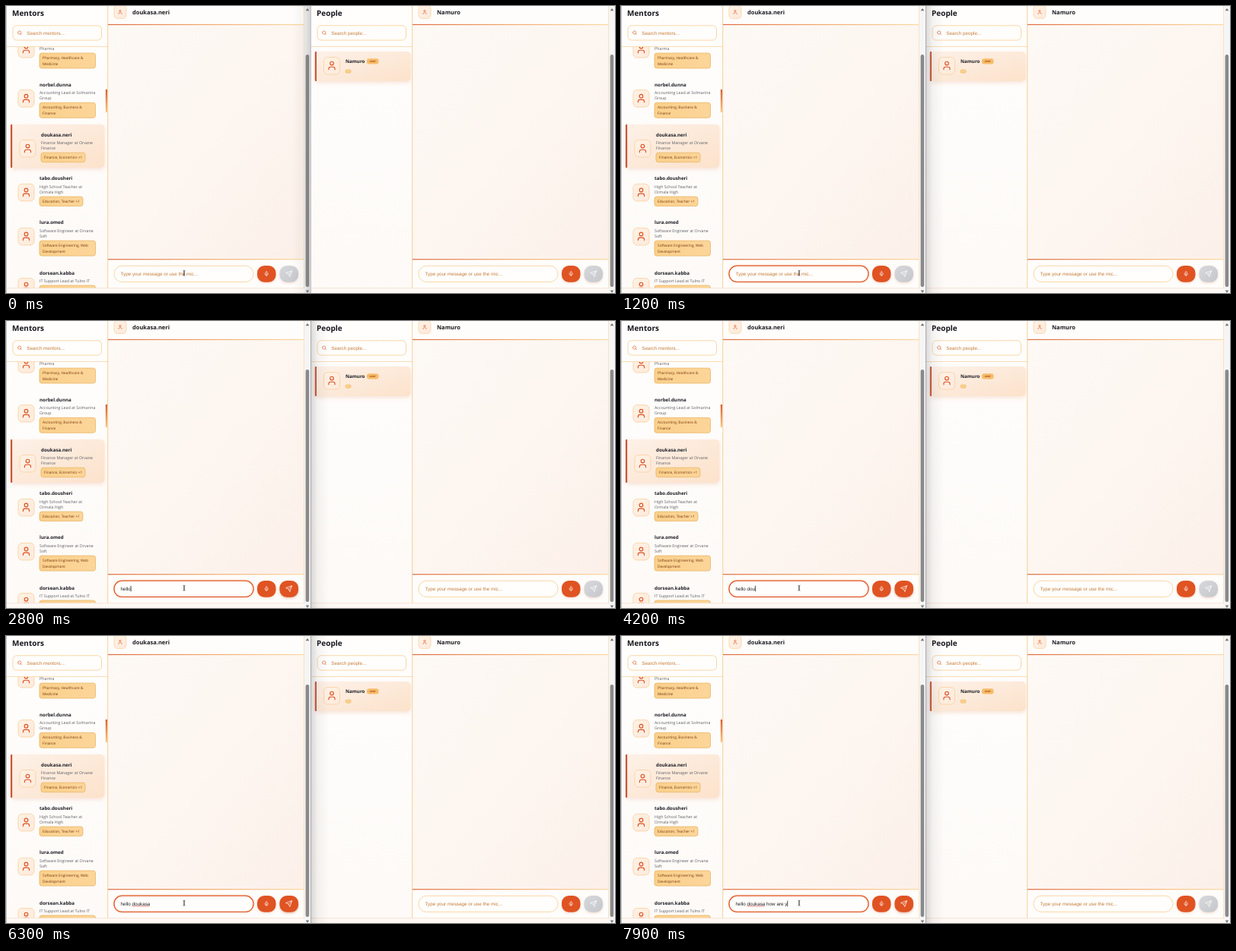
Animation, 800 px wide and 378 px high, one loop 8000 ms. Source, as an HTML page:

```html
<!DOCTYPE html>
<html lang="en">
<head>
<meta charset="utf-8">
<title>Mentor chat</title>
<style>
  html, body { margin: 0; width: 100%; height: 100%; overflow: hidden; background: #fff; }
  svg { display: block; width: 800px; height: 378px; }
  text { font-family: "Open Sans", "Noto Sans", sans-serif; text-rendering: geometricPrecision; white-space: pre; }
  .title { font-size: 10px; font-weight: 700; fill: #15151c; }
  .head { font-size: 7.5px; font-weight: 700; fill: #1c1c22; }
  .name { font-size: 6.2px; font-weight: 700; fill: #1f1f26; }
  .role { font-size: 5.3px; fill: #5d5f66; }
  .tag { font-size: 4.8px; font-weight: 500; fill: #7a3a12; }
  .field { font: 6.3px "Liberation Sans", Arial, sans-serif; fill: #c57a35; }
  .typed { fill: #222; }
  .icon { fill: none; stroke-linecap: round; stroke-linejoin: round; }
  .fade { opacity: 0; animation: 8s linear infinite both; }
  .focus { animation-name: focus; }
  .ready { animation-name: ready; }
  .idle { animation-name: idle; }
  @keyframes focus { 0%, 5% { opacity: 0 } 8%, 100% { opacity: 1 } }
  @keyframes ready { 0%, 25.6% { opacity: 0 } 29%, 100% { opacity: 1 } }
  @keyframes idle { 0%, 5% { opacity: 1 } 7%, 100% { opacity: 0 } }
</style>
</head>
<body>
<svg id="stage" viewBox="0 0 800 378" xmlns="http://www.w3.org/2000/svg"></svg>
<script>
const stage = document.getElementById('stage');

const text = (cls, x, y, s) => `<text class="${cls}" x="${x}" y="${y}">${s.replace('&', '&amp;')}</text>`;
const box = (x, y, w, h, r, fill, stroke = 'none', more = '') =>
  `<rect x="${x}" y="${y}" width="${w}" height="${h}" rx="${r}" fill="${fill}" stroke="${stroke}" ${more}/>`;
const icon = (d, x, y, scale, color, width = 2) =>
  `<path class="icon" d="${d}" stroke="${color}" stroke-width="${width}" transform="translate(${x} ${y}) scale(${scale}) translate(-12 -12)"/>`;
const gradient = (id, dir, ...stops) =>
  `<linearGradient id="${id}" ${dir}>` + stops.map(([o, c, a = 1]) =>
    `<stop offset="${o}" stop-color="${c}" stop-opacity="${a}"/>`).join('') + '</linearGradient>';

const USER = 'M19 21v-2a4 4 0 0 0-4-4H9a4 4 0 0 0-4 4v2M8 7a4 4 0 1 0 8 0a4 4 0 1 0-8 0';
const LENS = 'M3 11a8 8 0 1 0 16 0a8 8 0 1 0-16 0M21 21l-4.3-4.3';
const MIC = 'M12 2a3 3 0 0 0-3 3v7a3 3 0 0 0 6 0V5a3 3 0 0 0-3-3M19 10v2a7 7 0 0 1-14 0v-2M12 19v3';
const SEND = 'M22 2L11 13M22 2l-7 20-4-9-9-4z';

const avatar = (x, y) =>
  box(x, y, 21, 22.5, 5, 'url(#face)', '#fbd3a4', 'stroke-width=".9"') + icon(USER, x + 10.5, y + 11, .58, '#dd5226');

const tag = (x, y, w, lines) =>
  box(x, y, w, lines.length > 1 ? 20 : 12.5, 3, 'url(#tagFill)', '#e9b768', 'stroke-width=".8"') +
  lines.map((s, i) => text('tag', x + 4, y + 8 + i * 7.7, s)).join('');

const card = (x, y, w, h) =>
  box(x, y, w, h, 5, 'url(#cardFill)', 'none', 'filter="url(#soft)"') +
  `<path d="M${x + 2.2} ${y}H${x + 1}Q${x} ${y} ${x} ${y + 1}V${y + h - 1}Q${x} ${y + h} ${x + 1} ${y + h}H${x + 2.2}z" fill="#c9573a"/>`;

// y is the baseline of the name
const mentor = (x, y, name, roles, tagWidth, tags) =>
  avatar(x - 28, y + 5) + text('name', x, y, name) +
  roles.map((s, i) => text('role', x, y + 10.4 + i * 7.2, s)).join('') +
  tag(x, y + (roles.length > 1 ? 21.7 : 14.5), tagWidth, tags);

const button = (x, fill) => box(x, 342, 24.5, 21.8, 9.5, fill, 'none', 'filter="url(#drop)"');

function pane(x, title, hint, contact, list) {
  return `<g transform="translate(${x} 0)">` +
    box(0, 0, 400, 378, 0, '#fffdfb') +
    box(0, 0, 134, 372, 0, 'url(#side)') +
    box(134, 0, 257.5, 24, 0, '#fffdfb') +
    box(134, 24, 257.5, 310, 0, 'url(#chat)') +
    box(134, 334, 257.5, 37.5, 0, '#fffdfb') +
    `<g clip-path="url(#listClip)">${list}</g>` +
    text('title', 8, 12.8, title) +
    box(9, 25.8, 116.5, 19.2, 5, '#fffefd', '#fad29a', 'stroke-width=".9"') +
    icon(LENS, 18, 35.3, .27, '#d9612b', 2.4) +
    text('field', 27.3, 37.5, hint) +
    box(1, 53, 133, .9, 0, '#fad9ac') +
    box(133.2, 0, 1, 372, 0, '#f8cf98') +
    box(391, 0, .9, 372, 0, '#fae0bd') +
    box(0, 371.3, 392, .8, 0, '#f6dfca') +
    box(0, 372.1, 392, 6, 0, '#fdf8f4') +
    box(134, 23.9, 257.5, 1.2, 0, 'url(#rule)') +
    box(134, 333.1, 257.5, 1.2, 0, 'url(#rule)') +
    box(142, -1, 16, 17.5, 4.5, 'url(#face)', '#fbd3a4', 'stroke-width=".8"') +
    icon(USER, 150, 8, .29, '#dd5226') +
    text('head', 166, 11.3, contact) +
    box(142, 342.2, 183, 21.2, 10.4, '#fffefd', '#fad29a', 'stroke-width=".9"') +
    button(330, '#e05220') + icon(MIC, 342.2, 352.7, .3, '#fff') +
    button(359.5, 'url(#off)') + icon(SEND, 371.7, 352.8, .38, '#fff', 1.9) +
    box(392, 0, 8, 378, 0, '#f5f5f6') +
    box(393.6, 64, 4.6, 306, 2.2, '#8a8a8c') +
    '<path d="M393.7 6.3L396 3l2.3 3.3zM393.7 374.5L396 377.8l2.3-3.3z" fill="#747476"/>' +
    box(0, 0, .9, 378, 0, '#bdbdc0') + '</g>';
}

const mentors =
  avatar(16, 45.5) + text('role', 44, 57.5, 'Pharma') +
  tag(44, 62, 73.5, ['Pharmacy, Healthcare &', 'Medicine']) +
  mentor(44, 105.6, 'norbel.dunna', ['Accounting Lead at Solmarina', 'Group'], 73.5, ['Accounting, Business &', 'Finance']) +
  card(6, 156, 123.5, 57) +
  mentor(46, 171.5, 'doukasa.neri', ['Finance Manager at Orvane', 'Finance'], 58, ['Finance, Economics +1']) +
  mentor(44, 229.4, 'tabo.dousheri', ['High School Teacher at', 'Ormala High'], 57, ['Education, Teacher +1']) +
  mentor(44, 287.4, 'lura.omed', ['Software Engineer at Orvane', 'Soft'], 73.5, ['Software Engineering, Web', 'Development']) +
  mentor(44, 353.5, 'dorsean.kabba', ['IT Support Lead at Tulno IT'], 73.5, ['Information Technology', 'Support']) +
  box(130.8, 110, 2.4, 30, 0, 'url(#thumb)');

const people =
  card(5.8, 60, 126, 39) + avatar(17.5, 67.5) + text('name', 46, 75.3, 'Namuro') +
  box(74, 69.2, 15.5, 7.4, 3, '#f8bc69') +
  '<text x="81.7" y="74.4" text-anchor="middle" font-size="4" font-weight="600" fill="#9a4315">user</text>' +
  box(46.2, 84, 6.8, 4.2, 1.3, '#fbd08b', '#edbd70', 'stroke-width=".7"');

const DOWN = 'x2="0" y2="1"', SLANT = 'y2="1"';
stage.innerHTML = '<defs>' +
  gradient('side', DOWN, [0, '#fffefd'], [1, '#fdfaf7']) +
  gradient('chat', SLANT, [0, '#fdf9f5'], [.5, '#fdf6f1'], [1, '#fcf0e9']) +
  gradient('face', SLANT, [0, '#fff2e3'], [1, '#fdeadd']) +
  gradient('tagFill', '', [0, '#fad08a'], [1, '#fcd59a']) +
  gradient('cardFill', SLANT, [0, '#fdf1e8'], [1, '#fce2cb']) +
  gradient('rule', '', [0, '#df6c40'], [.5, '#f3a86b'], [1, '#fbd9a4']) +
  gradient('thumb', DOWN, [0, '#d65e38'], [1, '#fac986']) +
  gradient('off', SLANT, [0, '#d6d8dc'], [1, '#c5c7cb']) +
  gradient('shadeR', '', [0, '#555', .24], [.4, '#777', .08], [1, '#777', 0]) +
  gradient('shadeL', '', [0, '#777', 0], [.6, '#777', .07], [1, '#555', .22]) +
  '<clipPath id="listClip"><rect x="0" y="53.5" width="134" height="318"/></clipPath>' +
  '<filter id="soft" x="-20%" y="-30%" width="140%" height="170%"><feDropShadow dx="0" dy="2.5" stdDeviation="2.5" flood-color="#d96d3e" flood-opacity=".17"/></filter>' +
  '<filter id="drop" x="-30%" y="-30%" width="160%" height="170%"><feDropShadow dx="0" dy="1.2" stdDeviation="1.5" flood-color="#c96c46" flood-opacity=".26"/></filter>' +
  '<filter id="glow" x="-5%" y="-40%" width="110%" height="180%"><feDropShadow dx="0" dy="0" stdDeviation="1.3" flood-color="#e56a36" flood-opacity=".3"/></filter>' +
  '</defs>' +
  pane(0, 'Mentors', 'Search mentors...', 'doukasa.neri', mentors) +
  pane(400, 'People', 'Search people...', 'Namuro', people) +
  text('field', 550.5, 354.8, 'Type your message or use the mic...') +
  `<g class="fade idle">${box(376, 0, 24, 378, 0, 'url(#shadeL)')}</g>` +
  `<g class="fade focus">${box(400, 0, 24, 378, 0, 'url(#shadeR)')}` +
  box(142, 342.2, 183, 21.2, 10.4, '#fffefd', '#e05c2b', 'stroke-width="1.3" filter="url(#glow)"') + '</g>' +
  `<g class="fade ready">${button(359.5, '#e05220')}${icon(SEND, 371.7, 352.8, .38, '#fff', 1.9)}</g>` +
  text('field', 150.5, 354.8, 'Type your message or use the mic...').replace('<text', '<text id="hint"') +
  '<text id="typed" class="field typed" x="150.5" y="354.8"></text>' +
  '<path id="squiggle" fill="none" stroke="#d0342c" stroke-width=".6"/>' +
  '<path id="caret" d="M0 348.7v7.6" stroke="#222" stroke-width=".8"/>' +
  '<path d="M232.6 348.2q1.4 0 1.4 1v5q0 1-1.4 1M235.4 348.2q-1.4 0-1.4 1v5q0 1 1.4 1" fill="none" stroke="#444" stroke-width=".8"/>';

const [hint, typed, squiggle, caret] = ['hint', 'typed', 'squiggle', 'caret'].map(id => document.getElementById(id));
const LOOP = 8000, BLINK = 530, FOCUS = 400, SPELLCHECK = 5300, LEFT = 150.5;
const MESSAGE = 'hello doukasa how are y';
const KEYS = [2050, 2200, 2330, 2470, 2620, 3600, 3780, 3950, 4100, 4270, 4400, 4500, 4600, 4700,
  6500, 6650, 6800, 6950, 7100, 7250, 7400, 7560, 7750];

const ruler = document.createElement('canvas').getContext('2d');
ruler.font = '630px "Liberation Sans", Arial, sans-serif';
const widthOf = s => ruler.measureText(s).width / 100;

const from = LEFT + widthOf('hello '), to = LEFT + widthOf('hello doukasa');
let wave = `M${from} 356.4`;
for (let x = from + 1, i = 0; x <= to; x++, i++) wave += `L${x} ${i % 2 ? 356.4 : 355.6}`;
squiggle.setAttribute('d', wave);

const show = (el, on) => el.setAttribute('visibility', on ? 'visible' : 'hidden');

function draw(now) {
  const t = now % LOOP;
  const count = KEYS.filter(k => k <= t).length;
  const value = MESSAGE.slice(0, count);
  const since = t - (count ? KEYS[count - 1] : FOCUS);
  if (typed.textContent !== value) typed.textContent = value;
  show(hint, !count);
  show(squiggle, t >= SPELLCHECK);
  show(caret, since >= 0 && Math.floor(since / BLINK) % 2 === 0);
  caret.setAttribute('transform', `translate(${LEFT + .3 + widthOf(value)} 0)`);
  requestAnimationFrame(() => draw(performance.now() - start));
}
const start = performance.now();
draw(0);
</script>
</body>
</html>
```
